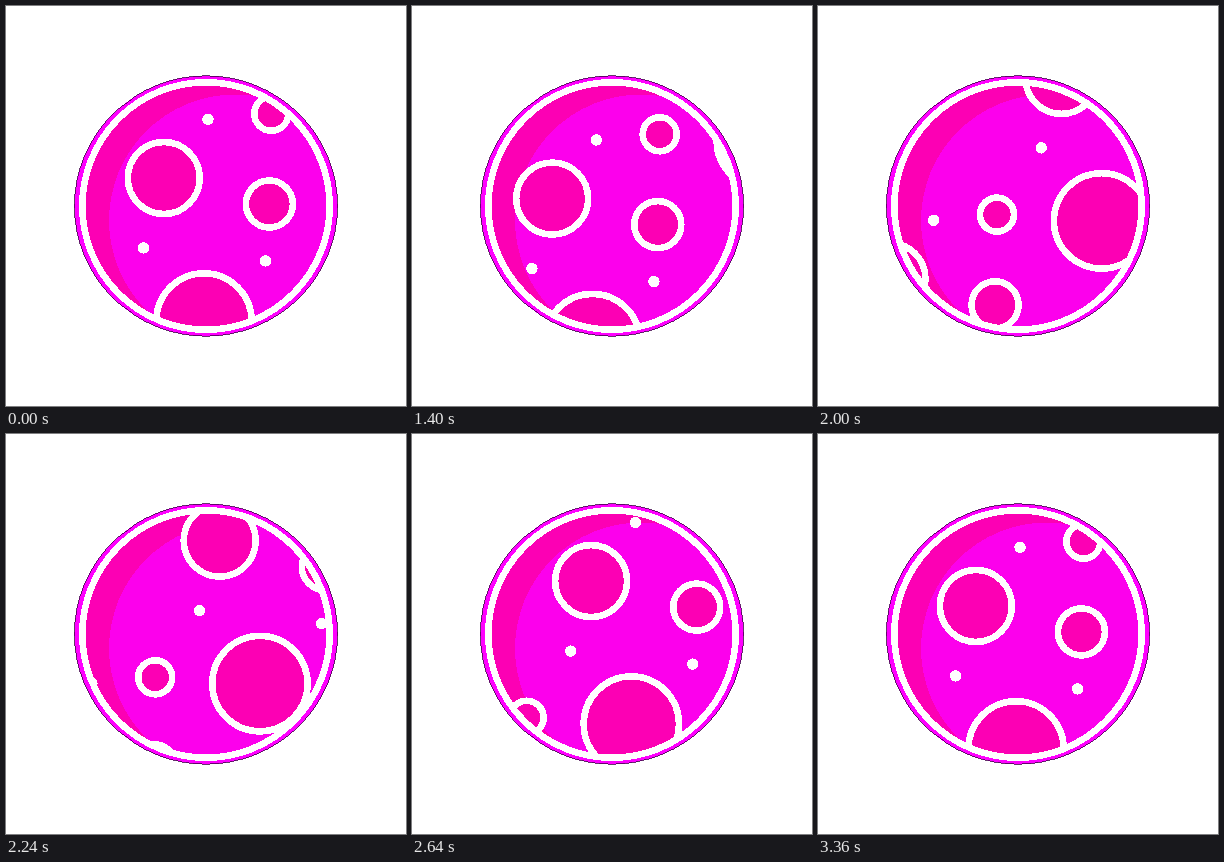
Write an HTML page without scripts that moves like this. It is 400 px wide and 400 px high and loops after 3.4 s.

```html
<!DOCTYPE html>
<html lang="en">
<head>
<meta charset="utf-8">
<title>Rolling moon</title>
<style>
  @property --tick { syntax: "<number>"; inherits: false; initial-value: 0; }
  @property --u { syntax: "<number>"; inherits: false; initial-value: 0; }
  @property --a { syntax: "<number>"; inherits: false; initial-value: 0; }
  @property --b { syntax: "<number>"; inherits: false; initial-value: 0; }
  @property --eased { syntax: "<number>"; inherits: false; initial-value: 0; }

  html, body { margin: 0; width: 100%; height: 100%; overflow: hidden; background: #fff; }
  svg { display: block; width: 100%; height: 100%; shape-rendering: crispEdges; }

  .shade { fill: #fc00b4; }
  .lit { fill: #fc00ec; }
  .crater { fill: #fc00b4; stroke: #fff; stroke-width: 6.6; }
  .dot { fill: #fff; }

  /* Stepped clock, eased by cubic-bezier(.355, 0, .42, 1) solved with two Newton steps. */
  .surface {
    --u: calc(var(--tick) / 60);
    --a: calc(var(--u) + (var(--u) - ((.805 * var(--u) - .87) * var(--u) + 1.065) * var(--u))
      / ((2.415 * var(--u) - 1.74) * var(--u) + 1.065));
    --b: calc(var(--a) + (var(--u) - ((.805 * var(--a) - .87) * var(--a) + 1.065) * var(--a))
      / ((2.415 * var(--a) - 1.74) * var(--a) + 1.065));
    --eased: calc(var(--b) * var(--b) * (3 - 2 * var(--b)));
    transform: translate(calc(var(--eased) * -172px), calc(var(--eased) * 201px));
    animation: clock 3400ms infinite;
  }

  @keyframes clock {
    0% { --tick: 0; animation-timing-function: steps(1, end); }
    29.41% { --tick: 1; animation-timing-function: steps(17, jump-none); }
    49.41% { --tick: 17; animation-timing-function: steps(1, end); }
    50.58% { --tick: 18; animation-timing-function: steps(42, end); }
    100% { --tick: 60; }
  }
</style>
</head>
<body>
<svg viewBox="0 0 400 400">
  <defs>
    <clipPath id="disc"><circle cx="200" cy="200" r="123"/></clipPath>
    <g id="craters">
      <circle class="crater" cx="157.8" cy="172" r="36"/>
      <circle class="crater" cx="263.4" cy="198" r="23.5"/>
      <circle class="crater" cx="265.3" cy="107.7" r="17"/>
      <circle class="crater" cx="198" cy="315" r="47.7"/>
      <circle class="dot" cx="202" cy="113.4" r="5.7"/>
      <circle class="dot" cx="137.5" cy="242" r="5.7"/>
      <circle class="dot" cx="259.5" cy="255" r="5.7"/>
    </g>
  </defs>

  <ellipse cx="200" cy="200" rx="131.6" ry="130.2" fill="#f0f" stroke="#40004a" stroke-width=".8"/>
  <g clip-path="url(#disc)">
    <circle class="shade" cx="200" cy="200" r="123"/>
    <circle class="lit" cx="229" cy="214.5" r="126"/>
    <g class="surface">
      <use href="#craters"/>
      <use href="#craters" x="172" y="-201"/>
    </g>
  </g>
  <circle cx="200" cy="200" r="123.7" fill="none" stroke="#fff" stroke-width="6.6"/>
</svg>
</body>
</html>
```
